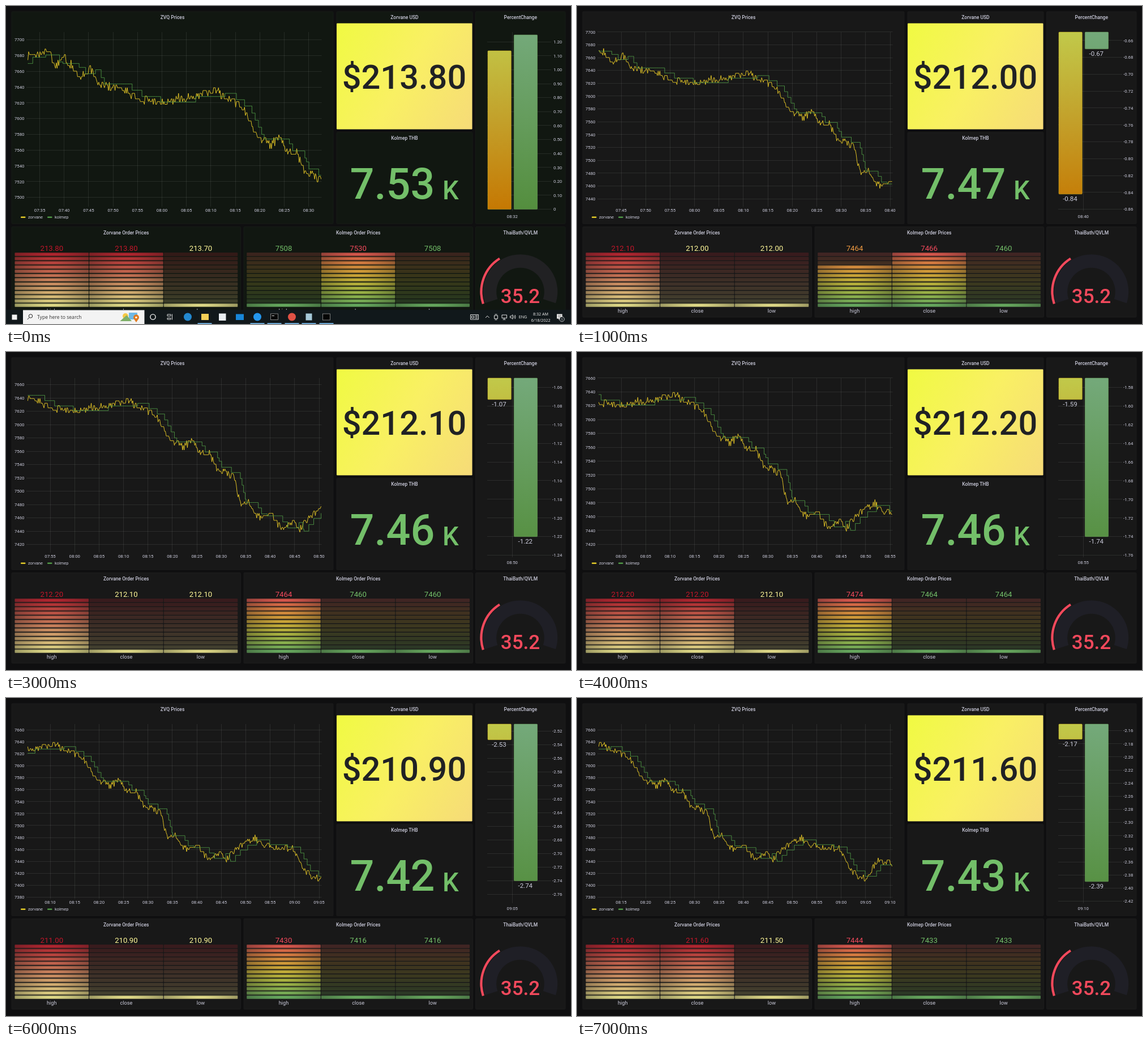
Recreate the animation shown at these times as an HTML page. Size 998x561 px, loop 8000 ms.

```html
<!DOCTYPE html>
<html lang="en">
<head>
<meta charset="utf-8">
<title>Price dashboard</title>
<style>
html, body { margin: 0; width: 100%; height: 100%; overflow: hidden; background: #0f0f10; }
svg { display: block; width: 100vw; height: 100vh; font-family: Roboto, sans-serif; }
</style>
</head>
<body>
<svg viewBox="0 0 998 561">
  <defs id="defs">
    <clipPath id="plot"><rect x="38" y="45" width="519.5" height="308"/></clipPath>
    <linearGradient id="gold" gradientUnits="userSpaceOnUse" x1="573.5" y1="48.5" x2="834" y2="199">
      <stop offset="0" stop-color="#f0fa42"/><stop offset=".5" stop-color="#f9f063"/><stop offset="1" stop-color="#f6db78"/>
    </linearGradient>
    <linearGradient id="barA" gradientUnits="userSpaceOnUse" x1="0" y1="46" x2="0" y2="359">
      <stop offset="0" stop-color="#c1c94a"/><stop offset=".5" stop-color="#c3a02a"/><stop offset="1" stop-color="#c57803"/>
    </linearGradient>
    <linearGradient id="barB" gradientUnits="userSpaceOnUse" x1="0" y1="46" x2="0" y2="359">
      <stop offset="0" stop-color="#74a97a"/><stop offset=".5" stop-color="#659c5c"/><stop offset="1" stop-color="#548e3e"/>
    </linearGradient>
  </defs>
  <g id="view"></g>
</svg>
<script>
const LOOP = 8000, STEP = 1000, CELLS = 13, START = 450, BASE = 7400;
const INK = '#ccccdc', RED = '#f2495c', GREEN = '#73bf69', GRID = 'rgba(195,210,200,.11)';
const view = document.getElementById('view');

// range: price axis; usd and thb: high, close, low; pct: change in each market
const states = [
  { range: [7490, 7710], usd: [213.8, 213.8, 213.7], thb: [7508, 7530, 7508], pct: [1.136, 1.25] },
  { range: [7430, 7700], usd: [212.1, 212, 212], thb: [7464.2, 7466, 7460], pct: [-.842, -.67] },
  { range: [7410, 7690], usd: [211.5, 211.5, 211.4], thb: [7441, 7442, 7432], pct: [-2.309, -2.069] },
  { range: [7410, 7670], usd: [212.2, 212.1, 212.1], thb: [7464, 7460, 7460], pct: [-1.073, -1.22] },
  { range: [7410, 7660], usd: [212.2, 212.2, 212.1], thb: [7474, 7464, 7464], pct: [-1.593, -1.74] },
  { range: [7410, 7660], usd: [211.8, 211.8, 211.7], thb: [7462, 7436, 7440], pct: [-2.172, -2.381] },
  { range: [7380, 7670], usd: [211, 210.9, 210.9], thb: [7430, 7416, 7416], pct: [-2.533, -2.74] },
  { range: [7380, 7670], usd: [211.6, 211.6, 211.5], thb: [7444, 7433, 7433], pct: [-2.173, -2.39] }
];

// Turning points of the price: minutes after 07:30, amount above BASE
const trend = [
  [0, 275], [7, 284], [8.2, 268], [10, 277], [13.6, 254], [15.5, 263], [17, 244], [22.2, 238], [25.4, 225],
  [29.7, 220], [41, 235], [43.5, 226], [47, 210], [49.6, 174], [52.5, 168], [54.3, 176], [55.5, 159],
  [57.7, 156], [59, 134], [62.6, 122], [64.1, 76], [65.6, 85], [67.3, 62], [70.1, 65], [72.7, 42],
  [74.8, 54], [75.7, 40], [78, 62], [81.8, 79], [83.7, 68], [89.5, 62], [92, 24], [94.8, 10], [97.4, 40], [101, 37]
];

function priceAt(t) {
  const i = Math.max(1, trend.findIndex(p => p[0] >= t));
  const [t0, v0] = trend[i - 1], [t1, v1] = trend[i];
  return v0 + (v1 - v0) * (t - t0) / (t1 - t0);
}

// Fast market jitters by ticks; slow market holds its price, then jumps after it
const fast = [], slow = [];
{
  let seed = 20, quick = 279, held = 270;
  const rand = () => (seed = seed * 16807 % 2147483647) / 2147483647;
  const tick = 3.517;
  for (let t = 2.4; t < 100.7; t += 1 / 6) {
    const v = priceAt(t), late = priceAt(t - 1.2);
    const next = Math.round((v + (rand() - .5) * 11) / tick) * tick;
    if (rand() > .25 || Math.abs(quick - v) > 6) quick = next;
    if (Math.abs(late - held) > 8 || rand() < .02) held = Math.round(late);
    fast.push([t, quick]);
    slow.push([t, held]);
  }
}

const rect = (x, y, w, h, fill, more = '') =>
  `<rect x="${x}" y="${y}" width="${w}" height="${h}" fill="${fill}" ${more}/>`;
const path = (d, stroke, w = 1, fill = 'none') =>
  `<path d="${d}" fill="${fill}" stroke="${stroke}" stroke-width="${w}"/>`;
const dot = (x, y, r, fill, more = '') => `<circle cx="${x}" cy="${y}" r="${r}" fill="${fill}" ${more}/>`;
// y is the vertical middle of the digits
const text = (x, y, s, size, fill = INK, anchor = 'middle', more = '') =>
  `<text x="${x}" y="${y + size * .356}" font-size="${size}" fill="${fill}" text-anchor="${anchor}" ${more}>${s}</text>`;
const bold = 'font-weight="500"';
const snap = v => Math.floor(v) + .5;

const clock = m => {
  const all = START + Math.floor(m);
  return [all / 60, all % 60].map(v => String(Math.floor(v)).padStart(2, '0')).join(':');
};
const endMinute = n => n ? 65.46 + n * 5 : 62.6;

const rgb = hex => [1, 3, 5].map(i => parseInt(hex.slice(i, i + 2), 16));
const warm = ['#fff899', '#c4162a'].map(rgb), traffic = [GREEN, '#fade2a', RED].map(rgb);

// Uniform B-spline through the colour stops
function ramp(stops, f) {
  const n = stops.length - 1, i = Math.min(n - 1, Math.floor(f * n)), t = f * n - i;
  const c = [0, 1, 2].map(k => {
    const p1 = stops[i][k], p2 = stops[i + 1][k];
    const p0 = i > 0 ? stops[i - 1][k] : 2 * p1 - p2;
    const p3 = i < n - 1 ? stops[i + 2][k] : 2 * p2 - p1;
    const t2 = t * t, t3 = t2 * t;
    return Math.round(((1 - 3 * t + 3 * t2 - t3) * p0 + (4 - 6 * t2 + 3 * t3) * p1 +
      (1 + 3 * t + 3 * t2 - 3 * t3) * p2 + t3 * p3) / 6);
  });
  return `rgb(${c})`;
}

let cells = '';
[warm, traffic].forEach((stops, p) => {
  for (let i = 0; i < CELLS; i++) {
    const c = ramp(stops, i / CELLS);
    cells += `<radialGradient id="cell${p}_${i}" r=".7071"><stop offset=".1" stop-color="${c}" stop-opacity=".9"/>` +
      `<stop offset="1" stop-color="${c}" stop-opacity=".45"/></radialGradient>`;
  }
});
document.getElementById('defs').insertAdjacentHTML('beforeend', cells);

function priceChart(n) {
  const [lo, hi] = states[n].range, end = endMinute(n);
  const X = t => 557 - (end - t) * 8.636;
  const Y = v => 45.8 + (hi - v) / (hi - lo) * 305.6;
  let labels = '', lines = '';
  for (let v = Math.ceil(lo / 20) * 20; v <= hi; v += 20) {
    lines += `M36 ${snap(Y(v))}H557.5`;
    labels += text(32.5, Y(v), v, 7.8, INK, 'end');
  }
  for (let t = Math.ceil((end - 60) / 5) * 5; t <= end; t += 5) {
    lines += `M${snap(X(t))} 46V354`;
    labels += text(X(t), 360, clock(t), 7.8);
  }
  const seen = p => p[0] >= end - 60.1 && p[0] <= end;
  const at = ([t, v]) => [X(t).toFixed(1), Y(v + BASE).toFixed(1)];
  const zigzag = 'M' + fast.filter(seen).map(p => at(p).join(' ')).join('L');
  const stairs = slow.filter(seen).map(at).map(([x, y], i) => i ? `H${x}V${y}` : `M${x} ${y}`).join('');
  const key = (x, color, name) => rect(x, 371.5, 8.5, 2.2, color, 'rx="1"') + text(x + 13, 372.6, name, 7.4, INK, 'start');
  return path(lines, GRID) + labels + '<g clip-path="url(#plot)" stroke-linejoin="round">' +
    path(zigzag, '#f0d028', .9) + path(stairs, '#56a64b', .8) + '</g>' +
    key(26, '#fade2a', 'zorvane') + key(73, '#56a64b', 'kolmep');
}

function percentChart(n) {
  const [a, b] = states[n].pct, up = a > 0;
  const pad = Math.abs(a - b) / 10, step = up ? .1 : .02;
  const hi = Math.ceil((Math.max(a, b) + pad) * 100) / 100;
  const lo = up ? 0 : Math.floor((Math.min(a, b) - pad) * 100) / 100;
  const Y = v => 46 + (hi - v) / (hi - lo) * 312.6;
  const base = up ? Y(0) : 46;
  let labels = '', lines = 'M894.5 46V362';
  for (let k = Math.ceil(lo / step - .01); k * step <= hi + .001; k++) {
    const y = Y(k * step);
    lines += `M850 ${snap(y)}H963`;
    labels += text(up ? 967 : 965, y, k ? (k * step).toFixed(2) : '0', 7.8, INK, 'start');
  }
  const bar = (x, v, fill, edge) =>
    rect(x, Math.min(Y(v), base), 41.3, Math.abs(Y(v) - base), fill, `rx="1.2" stroke="${edge}" stroke-width=".5"`) +
    (up ? '' : text(x + 20, Y(v) + 8.4, v.toFixed(2), 11.5));
  return path(lines, GRID) + labels + bar(851, a, 'url(#barA)', '#d8b81c') + bar(897.3, b, 'url(#barB)', '#73a95f') +
    text(894.3, 371, clock(endMinute(n)), 7.8);
}

function orders(p, x, stops, values, digits) {
  const lo = Math.min(...values), span = Math.max(...values) - lo;
  let s = '';
  ['high', 'close', 'low'].forEach((name, c) => {
    const left = x + c * 131.6, mid = left + 65.3, v = values[c];
    const lit = Math.min(CELLS, 1 + Math.floor((v - lo) * CELLS / span));
    s += text(mid, 427, v.toFixed(digits), 13.2, ramp(stops, (v - lo) / span)) + text(mid, 537.3, name, 9.2);
    for (let i = 0; i < CELLS; i++) {
      const y = 524.8 - i * 7.475;
      s += i < lit ? rect(left, y, 130.6, 6.1, `url(#cell${p}_${i})`, 'rx="1"')
        : rect(left, y, 130.6, 6.1, ramp(stops, i / CELLS), 'rx="1" fill-opacity=".18"');
    }
  });
  return s;
}

function gauge(track) {
  const at = (r, deg) => {
    const a = deg * Math.PI / 180;
    return (908.5 + r * Math.cos(a)).toFixed(2) + ' ' + (504 - r * Math.sin(a)).toFixed(2);
  };
  const arc = (r, from, to) => `M${at(r, from)}A${r} ${r} 0 ${from - to > 180 ? 1 : 0} 1 ${at(r, to)}`;
  return path(arc(54, 198, -18), track, 23.5) + path(arc(69, 198, 122), RED, 4.2) +
    text(908.5, 512, '35.2', 35, RED, 'middle', bold);
}

function taskbar() {
  const sans = 'font-family="Open Sans, sans-serif"', pale = '#f2f2f2';
  const frame = 'stroke="#999" stroke-width=".8"';
  const label = (x, y, s) => text(x, y, s, 7.2, pale, 'middle', sans);
  let s = rect(0, 536, 998, 25, '#11181b') + rect(10.5, 544.5, 9, 9, pale) + rect(30, 536.5, 214.5, 24.5, '#f3f3f3') +
    dot(43.5, 547, 3.2, 'none', 'stroke="#222"') + path('M41.2 549.5L37.8 553', '#222') +
    text(55, 548.6, 'Type here to search', 8.6, '#333', 'start', sans);
  // search picture: sun, map, hill, pin
  s += dot(211, 547, 5, '#f6c945') + rect(217, 541, 15, 12, '#6fb9e6', 'rx="1"') +
    path('M204 555L213 547L220 555Z', '#7fb069', 2, '#7fb069') +
    path('M230 558L225.5 551.5A5 5 0 1 1 234.5 551.5Z', 'none', 0, '#e07a1f') + dot(230, 549.5, 1.7, '#fff');
  s += dot(259.5, 548.5, 4.6, 'none', `stroke="${pale}" stroke-width="1.4"`) +
    path('M285 544H291V547H285ZM285 550.5H291V553H285ZM293.5 543.5V553.5', pale, .9);
  s += dot(321, 548.5, 7, '#2388d0') + rect(345, 543, 13, 11, '#f5cf57') + rect(376, 542.5, 12.5, 12.5, '#e9eef2') +
    rect(406, 543.5, 14, 10.5, '#1886d9') + dot(444, 548.5, 7, '#2496ed') + rect(467.5, 543, 13, 10.5, '#050505', frame) +
    path('M469.5 546.5H474', pale, .9) + dot(505, 548.5, 7, '#df5144') + rect(529.5, 542.5, 11, 12, '#a5c8d8') +
    rect(559.5, 543, 13, 11, '#050505', frame);
  for (const x of [351, 444, 474, 505, 535, 566]) s += rect(x - 12.5, 559.3, 25, 1.7, '#76b9ed');
  // news, tray arrow, camera, network, speaker
  s += path('M820.5 544.5H834.5V553H820.5ZM822.5 547H826.5V550.5H822.5ZM828.5 546.5H833M828.5 548.7H833M828.5 551H833' +
    'M847 550L850.3 546.7L853.6 550M862.5 546H868.5V551.5H862.5ZM863.5 544H867.5M863.5 553.5H867.5' +
    'M876 545H884.5V550.5H876ZM880 550.5V553M877.5 553.2H882.5' +
    'M890.5 547H892.5L895 544.7V552.3L892.5 550H890.5ZM897 546.5Q898.5 548.5 897 550.5M899 545Q901 548.5 899 552', pale, .9);
  s += label(913, 548.6, 'ENG') + label(944.5, 543, '8:32 AM') + label(944.5, 554, '6/18/2022');
  return s + path('M973 543.5H982.5V551.5H979L976.5 554V551.5H973Z', 'none', 0, pale) +
    path('M974.5 546H981M974.5 548.5H981', '#333', .7) +
    dot(982, 552.5, 4.3, '#20282c', `stroke="${pale}" stroke-width=".7"`) + text(982, 552.5, '1', 6, pale, 'middle', sans);
}

const panels = [
  [10, 10, 568, 374, 'ZVQ Prices'], [584, 10, 240, 207.5, 'Zorvane USD'], [584, 223, 240, 161, 'Kolmep THB'],
  [829.5, 10, 158.5, 374, 'PercentChange'], [10, 389.5, 404.5, 159.5, 'Zorvane Order Prices'],
  [420, 389.5, 404.5, 159.5, 'Kolmep Order Prices'], [829.5, 389.5, 158.5, 159.5, 'ThaiBath/QVLM']
];

function draw(n) {
  const { usd, thb } = states[n], desktop = n === 0;
  const look = desktop ? { panel: '#111711', edge: '#1b201b', track: '#212123' }
    : { panel: '#181818', edge: '#212121', track: '#1f1f26' };
  let s = rect(0, 0, 998, 561, '#0f0f10');
  for (const [x, y, w, h, title] of panels)
    s += rect(x, y, w, h, look.panel, `rx="1.2" stroke="${look.edge}" stroke-width=".7"`) +
      text(x + w / 2, y + 10, title, 8.5, INK, 'middle', bold);
  s += rect(584, 30.5, 239.5, 187, 'url(#gold)', 'rx="1.2"') +
    text(703.5, 124.6, '$' + usd[1].toFixed(2), 59.5, '#202124', 'middle', bold) +
    text(607.5, 313.6, (thb[1] / 1000).toFixed(2), 75.5, GREEN, 'start', bold) +
    text(771, 324.4, 'K', 45.3, GREEN, 'start', bold);
  s += priceChart(n) + percentChart(n) + orders(0, 15.5, warm, usd, 2) + orders(1, 425.2, traffic, thb, 0) + gauge(look.track);
  view.innerHTML = desktop ? s + taskbar() : s;
}

let shown = -1;
function frame() {
  const n = Math.floor(performance.now() % LOOP / STEP);
  if (n !== shown) draw(shown = n);
  requestAnimationFrame(frame);
}
frame();
</script>
</body>
</html>
```
